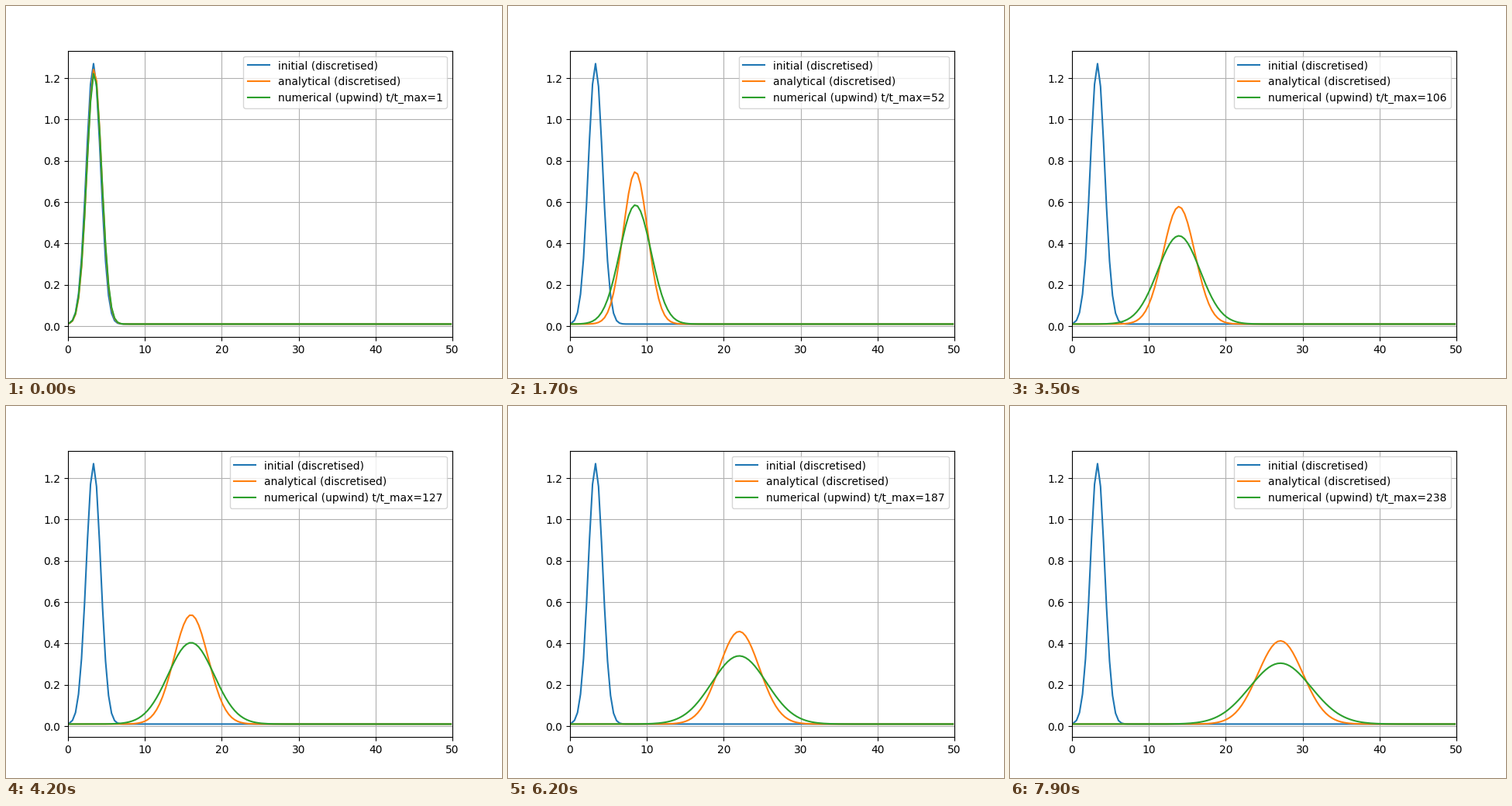
A matplotlib script for the animation above (8000 ms loop, 640x480 px).

```python
import matplotlib.pyplot as plt
import numpy as np
from matplotlib.animation import FuncAnimation

LENGTH, CELLS = 50, 128
FRAMES, STRIDE = 80, 3
DT, SPEED = 0.1, 1.0
START, MASS, VARIANCE, BACKGROUND = 3.31, 2.95, 0.872, 0.01
DIFFUSION = 0.161
UPWIND_DIFFUSION = 0.317  # physical plus numerical spreading

dx = LENGTH / CELLS
x = (np.arange(CELLS) + 0.5) * dx


def pulse(step, diffusion):
    """Advected and diffused Gaussian after a number of time steps."""
    t = step * DT
    var = VARIANCE + 2 * diffusion * t
    peak = MASS / np.sqrt(2 * np.pi * var)
    return BACKGROUND + peak * np.exp(-(x - START - SPEED * t) ** 2 / (2 * var))


fig, ax = plt.subplots(figsize=(6.4, 4.8), dpi=100)
initial = pulse(0, DIFFUSION)
ax.plot(x, initial, label="initial (discretised)")
analytical, = ax.plot(x, initial, label="analytical (discretised)")
numerical, = ax.plot(x, initial)
ax.set_xlim(0, LENGTH)
margin = 0.05 * (initial.max() - BACKGROUND)
ax.set_ylim(BACKGROUND - margin, initial.max() + margin)
ax.grid(True)


def update(frame):
    step = 1 + STRIDE * frame
    analytical.set_ydata(pulse(step, DIFFUSION))
    numerical.set_ydata(pulse(step, UPWIND_DIFFUSION))
    numerical.set_label(f"numerical (upwind) t/t_max={step}")
    legend = ax.legend(loc="upper right")
    return analytical, numerical, legend


anim = FuncAnimation(fig, update, frames=FRAMES, interval=100, repeat=True,
                     repeat_delay=0, blit=False)
plt.show()
```
